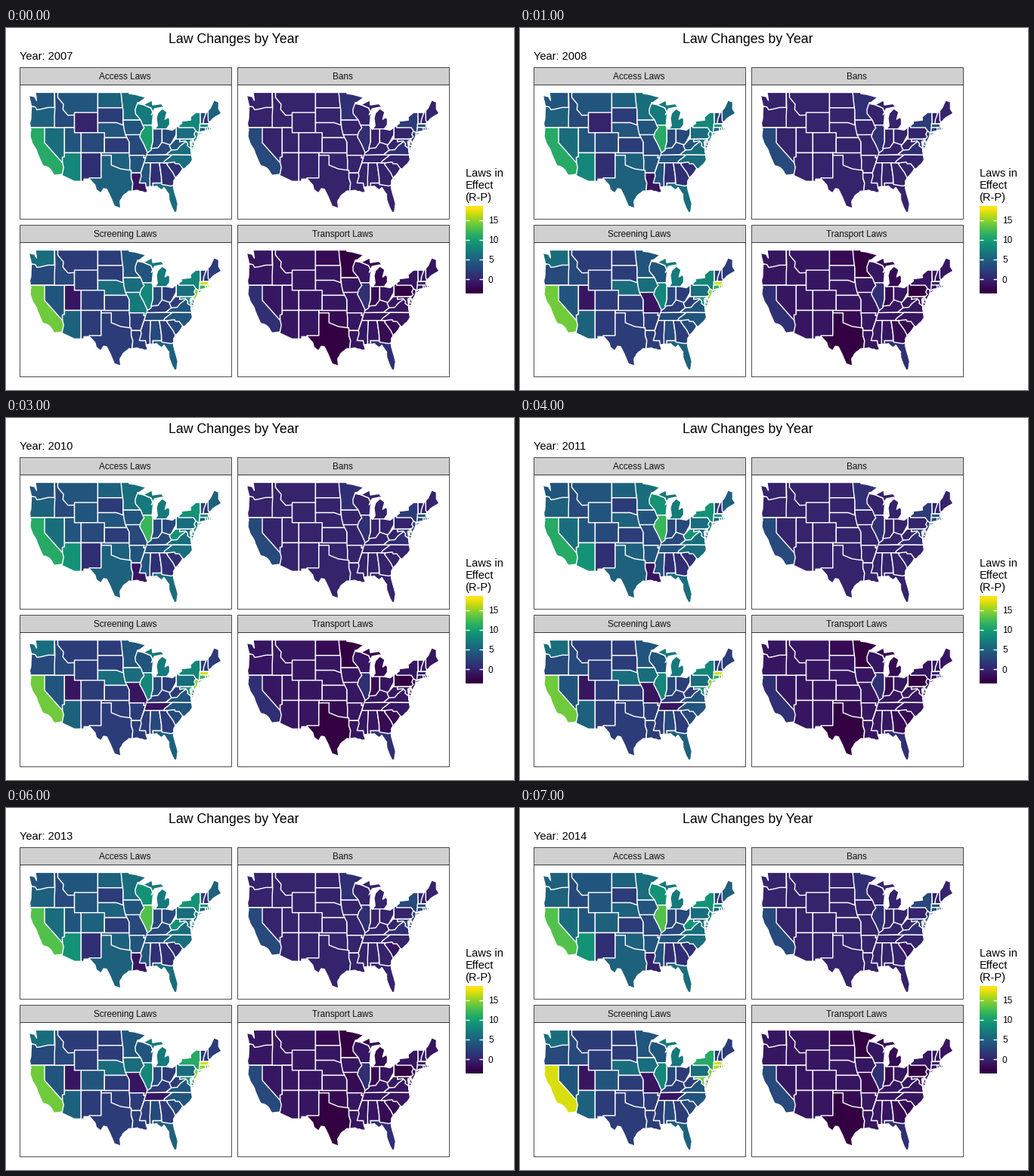
A matplotlib script that plays this animation: 672x480 px, repeating every 8000 ms.

```python
import numpy as np
import matplotlib.pyplot as plt
from matplotlib.animation import FuncAnimation
from matplotlib.collections import PolyCollection
from matplotlib.patches import Polygon, Rectangle

DPI, WIDTH, HEIGHT = 96, 672, 480
FIRST_YEAR, YEARS = 2007, 8
LOW, HIGH = -3, 18
PANEL_W, PANEL_H, STRIP_H = 280, 178, 23
LEFT, TOP, STEP_X, STEP_Y = 17.5, 51.5, 288, 209
LINE = 1.42 * 72 / DPI

plt.rcParams["font.family"] = "Liberation Sans"
rng = np.random.default_rng(3)


def path(*degrees):
    """Points from alternating degrees west and north."""
    return np.reshape(degrees, (-1, 2))


def box(west, east, south, north):
    return path(west, north, east, north, east, south, west, south)


def rough(points, pieces=3, size=0.05):
    """Split each stretch of coast and shake the new points a little."""
    at = np.arange((len(points) - 1) * pieces + 1) / pieces
    fine = np.column_stack([np.interp(at, np.arange(len(points)), c) for c in points.T])
    shake = rng.normal(0, size, fine.shape)
    shake[::pieces] = 0
    return fine + shake


PACIFIC = path(124.7, 48.4, 124, 46.3, 124.1, 44, 124.45, 42.8, 124.1, 41.5, 124.35, 40.3,
               123.7, 38.9, 122.5, 37.6, 121.9, 36.5, 120.65, 34.6, 119.2, 34.15,
               118.4, 33.8, 117.1, 32.53)
SOUTH = path(114.72, 32.72, 114.8, 32.5, 111.07, 31.33, 108.2, 31.33, 108.2, 31.78,
             106.5, 31.78, 104.9, 30.6, 104.5, 29.65, 103.15, 28.98, 102.3, 29.88,
             101.4, 29.77, 100.3, 28.3, 99.1, 26.4, 97.15, 25.95)
GULF = path(97.4, 27.3, 96.6, 28.3, 94.7, 29.4, 92.2, 29.55, 90.1, 29.1, 89.1, 29.1,
            89.5, 30.2, 88, 30.3, 86.4, 30.4, 85, 29.6, 84.2, 30.1, 82.7, 28.7,
            82.75, 27.8, 81.75, 25.95, 81.1, 25.13)
ATLANTIC = path(80.4, 25.2, 80.03, 26.8, 81.3, 29.9, 81.3, 31.4, 79.2, 33.2, 78.55, 33.85,
                77.9, 33.9, 76.6, 34.7, 75.7, 35.6, 76, 36.9, 76.4, 39.2, 76.1, 39.4,
                76.1, 38.2, 75.95, 37.15, 75.05, 38.45, 75.55, 39.5, 74.9, 38.95, 74, 40.4,
                71.9, 41.07, 73.7, 40.95, 71.2, 41.5, 69.95, 41.65, 70.2, 42.05,
                70.5, 41.78, 71, 42.3, 70.7, 43.08, 69.1, 44, 67, 44.85)
NORTH = path(67.8, 45.7, 67.8, 47.07, 69.23, 47.46, 70.3, 45.9, 71.1, 45.3, 71.5, 45,
             74.7, 45, 76.3, 44.1, 76.2, 43.5, 79.05, 43.27, 78.9, 42.85, 81.7, 41.5)
LAKES = path(83.45, 41.73, 82.5, 42.6, 82.5, 43.7, 82.95, 44.07, 83.9, 43.65, 83.3, 45.1,
             84.75, 45.78, 86.1, 44.9, 86.5, 43.9, 86.2, 42.4, 87, 41.65, 87.8, 42.3,
             87.5, 44.4, 87.05, 45.25, 88, 44.55, 87.05, 45.75, 84.8, 46.05, 84, 45.95,
             85, 46.75, 87.6, 46.5, 87.8, 47.45, 90.4, 46.55, 92.1, 46.75, 89.6, 48)
BORDER = path(92.9, 48.6, 94.6, 48.75, 95.15, 49.38, 95.15, 49, 122.75, 49, 122.4, 47.4,
              123, 48.15)
LAND = np.vstack([rough(PACIFIC), SOUTH, rough(GULF), rough(ATLANTIC), NORTH, LAKES, BORDER])

# Each state covers the earlier ones and the land outline trims them all,
# so a state may run into the sea and under its later neighbours.
STATES = dict(
    OR=box(125, 116.5, 42, 46.2),
    MT=box(116.5, 104.05, 44.4, 49),
    WA=path(125, 49.5, 117.03, 49.5, 117.03, 46, 119, 46, 121.2, 45.65, 122.3, 45.55,
            122.8, 46.1, 124.2, 46.3),
    CA=box(125, 114, 32, 42),
    NV=path(120, 42, 114.04, 42, 114.04, 36.2, 114.63, 35, 120, 39),
    ID=path(117.03, 49.5, 116.05, 49.5, 116.05, 48, 114.35, 46.65, 114.5, 45.6, 113, 44.45,
            111.05, 44.5, 111.05, 42, 117.03, 42, 117.03, 44.2, 116.9, 46),
    UT=box(114.04, 109.05, 37, 42),
    WY=box(111.05, 104.05, 41, 45),
    NE=box(104.05, 95.3, 40, 43),
    CO=box(109.05, 102.05, 37, 41),
    AZ=path(114.04, 37, 109.05, 37, 109.05, 31, 115, 31, 114.72, 32.72, 114.3, 34.1,
            114.63, 35, 114.7, 36.1, 114.04, 36.2),
    NM=box(109.05, 103.05, 31, 37),
    OK=box(103, 94.43, 33.5, 37),
    KS=box(102.05, 94.62, 37, 40),
    TX=path(103.04, 36.5, 100, 36.5, 100, 34.56, 97.2, 33.8, 94.04, 33.5, 94.04, 32,
            93.55, 31, 93.8, 29, 97, 25, 107, 25, 106.62, 32, 103.06, 32),
    ND=box(104.05, 96.6, 45.94, 49),
    SD=path(104.05, 45.94, 96.45, 45.94, 96.45, 42.5, 98.5, 43, 104.05, 43),
    MN=path(97.23, 50, 89, 50, 91, 43.5, 96.45, 43.5, 96.45, 45.3, 96.8, 47),
    IA=path(96.5, 43.5, 91, 43.5, 90, 42, 91.2, 40.5, 95.77, 40.58, 96.2, 41.8),
    MO=path(95.77, 40.58, 91, 40.6, 89, 37, 89.5, 36, 90.35, 36, 90.15, 36.5, 94.62, 36.5,
            94.62, 39.1, 95.3, 40),
    AR=path(94.62, 36.5, 90.15, 36.5, 90.35, 36, 89.7, 36, 91.2, 33, 94.04, 33,
            94.04, 33.5, 94.48, 33.65, 94.43, 35.4),
    LA=path(94.04, 33, 90.9, 33, 90.9, 31, 89.7, 31, 88.5, 28, 94, 28, 93.55, 31, 94.04, 32),
    WI=path(92.85, 45.6, 92.1, 47, 90.4, 47, 90.4, 46.55, 88.1, 45.9, 87.6, 45.1,
            86.5, 45.3, 86.5, 42.5, 90.6, 42.5, 91.2, 43.5, 92.75, 44.75),
    KY=path(89.4, 36.5, 89.2, 37.2, 88, 38, 85, 39.2, 82.5, 39, 82, 37.5, 83.68, 36.6),
    IL=path(90.6, 42.5, 87.53, 42.5, 87.53, 39.2, 88.1, 37.5, 89.15, 37, 90.2, 38.6,
            91.5, 40.2, 91.05, 41.2, 90.15, 41.95),
    IN=path(87.53, 42, 84.8, 42, 84.8, 39.1, 86, 38, 88.1, 37.85, 87.53, 39.2),
    OH=path(84.8, 42, 80.52, 42.5, 80.52, 40.64, 82.2, 38.6, 83, 38.7, 84.8, 39.1),
    MI=path(90.4, 46.55, 88.1, 45.9, 87.6, 45.1, 86.9, 45.4, 87, 41.74, 82, 41.74, 82, 48,
            88, 48),
    TN=path(89.5, 36.55, 81.68, 36.6, 84.32, 35, 90.15, 35),
    FL=box(87.6, 79, 25, 31),
    MS=path(88.2, 35, 90.15, 35, 91.2, 33, 91, 32.4, 91.6, 31, 89.75, 31, 89.5, 29.9,
            88.4, 30),
    AL=path(88.2, 35, 85.6, 35, 85, 32.3, 85, 31, 87.6, 31, 87.5, 30, 88.4, 30, 88.45, 31.9),
    SC=box(83.4, 78, 32, 35.2),
    GA=path(85.6, 35, 83.1, 35, 83.35, 34.7, 81.5, 33, 80.5, 31.6, 81, 30.7, 82.05, 30.4,
            84.86, 30.7, 85, 32.3),
    VA=path(83.68, 36.58, 81.97, 37.54, 77.9, 39.5, 75, 38, 75, 36.55),
    NC=path(84.32, 35, 84, 35.4, 81.68, 36.59, 75, 36.55, 75, 33, 78.55, 33.85, 79.65, 34.8,
            80.8, 34.82, 81.05, 35.15, 83.1, 35),
    WV=path(80.52, 40.64, 80.52, 39.72, 79.48, 39.72, 79.48, 39.2, 77.75, 39.6, 77.8, 39.15,
            79.3, 38.4, 80.3, 37.6, 81.97, 37.54, 82.6, 38.4, 80.85, 39.7),
    PA=box(80.52, 74.7, 39.72, 42.3),
    MD=path(79.48, 39.72, 75, 39.72, 75, 38, 76.2, 37.9, 77.2, 38.4, 77.05, 38.8,
            77.75, 39.35, 79.48, 39.2),
    DE=box(75.79, 75, 38.45, 39.82),
    NJ=path(74.7, 41.36, 73.9, 41, 73.5, 39, 74.9, 38.9, 75.55, 39.55, 74.75, 40.2,
            75.2, 40.65),
    NY=path(79.76, 46, 73.35, 46, 73.27, 42.75, 73.5, 41.2, 71.5, 41.2, 71.5, 40.5,
            74, 40.5, 73.9, 41, 74.7, 41.36, 75.35, 42, 79.76, 42),
    VT=path(73.35, 45.1, 71.5, 45.1, 72.45, 42.73, 73.27, 42.73),
    ME=box(71.05, 66, 43, 48),
    NH=path(71.5, 45.1, 71.05, 45.5, 70.97, 43.4, 70.6, 43, 70.8, 42.8, 72.45, 42.73,
            72.3, 43.6),
    MA=box(73.5, 69, 41.3, 42.73),
    CT=path(73.5, 42.04, 71.8, 42.04, 71.8, 41.25, 73.7, 41),
    RI=box(71.8, 71.2, 41.2, 42.04),
)


def levels(default, groups):
    """Value of each state; groups maps a value to the states that have it."""
    table = dict.fromkeys(STATES, default)
    for value, names in groups.items():
        table.update(dict.fromkeys(names.split(), value))
    return table


START = {
    "Access Laws": levels(4, {
        -1: "LA", 0: "WY", 1: "NM AL GA SC NH", 2: "SD KS", 3: "ID CO MO IN OH KY VT",
        5: "TX OK ND OR ME CT DE", 6: "NV MN FL VA NC PA MD RI", 7: "WI MI",
        8: "AZ NY NJ", 9: "MA", 10: "IL", 11: "CA"}),
    "Bans": levels(0, {1: "MN IL VA", 2: "NY MD", 3: "CA CT NJ", 4: "MA"}),
    "Screening Laws": levels(2, {
        -1: "UT", 3: "OR ID IN TN AL SC", 4: "NV MN WI NC VA", 5: "AZ FL DE",
        6: "WA NE IA PA", 7: "MO MI", 8: "IL NY", 9: "MD", 11: "RI", 12: "CT",
        14: "CA", 15: "NJ", 17: "MA"}),
    "Transport Laws": levels(-1, {
        -3: "MN TX PA", -2: "ND OK GA MI IN SC", 0: "MA", 1: "CA IL FL"}),
}
CHANGES = {
    "Access Laws": {2008: dict(IL=11), 2009: dict(IL=12, NY=9, WV=8),
                    2010: dict(AZ=9, WY=4, WV=9), 2011: dict(WI=9, NE=5),
                    2013: dict(CA=13, IL=13, CO=5), 2014: dict(WA=5, LA=0)},
    "Bans": {2012: dict(SC=-1), 2013: dict(NY=3), 2014: dict(CT=4, MD=3)},
    "Screening Laws": {2008: dict(MO=-1), 2009: dict(TN=-1),
                       2013: dict(CO=4, NY=11, CT=15), 2014: dict(CA=17, CT=16, MD=14)},
    "Transport Laws": {2012: dict(CA=2), 2013: dict(CA=3, MO=-2)},
}


def shade(t):
    rgba = plt.get_cmap("viridis")(np.clip(t, 0, 1))
    rgba[..., :3] **= 1.22
    return rgba


def colours(name, year):
    table = dict(START[name])
    for when, change in CHANGES[name].items():
        if when <= year:
            table.update(change)
    return shade((np.array(list(table.values())) - LOW) / (HIGH - LOW))


def project(points, dx, dy):
    lon, lat = points.T
    return np.column_stack([dx + 30.4 + (124.68 - lon) * 4.413,
                            dy + 82.85 + (49.38 - lat) * 6.673])


fig = plt.figure(figsize=(WIDTH / DPI, HEIGHT / DPI), dpi=DPI, facecolor="white")
ax = fig.add_axes([0, 0, 1, 1])
ax.axis("off")


def label(x, y, text, size, **style):
    return ax.text(x, y, text, fontsize=size, va="baseline", **style)


def frame_box(x, y, w, h, fill):
    ax.add_patch(Rectangle((x, y), w, h, fc=fill, ec="#242424", lw=0.8 * 72 / DPI))


def draw_map(dx, dy):
    coast = ax.add_patch(Polygon(project(LAND, dx, dy), fill=False, ec="white", lw=LINE,
                                 joinstyle="round", zorder=3))
    states = PolyCollection([project(s, dx, dy) for s in STATES.values()],
                            edgecolors="white", linewidths=LINE, joinstyle="round",
                            snap=False, zorder=2)
    ax.add_collection(states, autolim=False)
    states.set_clip_path(coast)
    return states


maps = {}
for i, name in enumerate(START):
    dx, dy = i % 2 * STEP_X, i // 2 * STEP_Y
    x, y = LEFT + dx, TOP + dy
    frame_box(x, y + STRIP_H, PANEL_W, PANEL_H, "white")
    frame_box(x, y, PANEL_W, STRIP_H, "#d0d0d0")
    label(x + PANEL_W / 2, y + 16.3, name, 8.8, ha="center", color="#101010")
    maps[name] = draw_map(dx, dy)

label(301.7, 20, "Law Changes by Year", 13.3, ha="center")
year_text = label(17.7, 42, "", 11)

for row, text in enumerate(("Laws in", "Effect", "(R-P)")):
    label(607.5, 197 + 15.8 * row, text, 11)
bar = shade(np.linspace(1.026, -0.026, 230))[:, None]
ax.imshow(bar, extent=(608, 631, 352.2, 237), aspect="auto", interpolation="bilinear")
for value in (0, 5, 10, 15):
    y = 333.4 - value * 5.22
    ax.hlines([y, y], [608, 626.4], [612.6, 631], colors="white", lw=LINE)
    label(638, y + 4.2, str(value), 8.8)
ax.set(xlim=(0, WIDTH), ylim=(HEIGHT, 0))


def update(i):
    year = FIRST_YEAR + i
    year_text.set_text(f"Year: {year}")
    for name, states in maps.items():
        states.set_facecolor(colours(name, year))


anim = FuncAnimation(fig, update, frames=YEARS, interval=1000, repeat=True)
plt.show()
```
